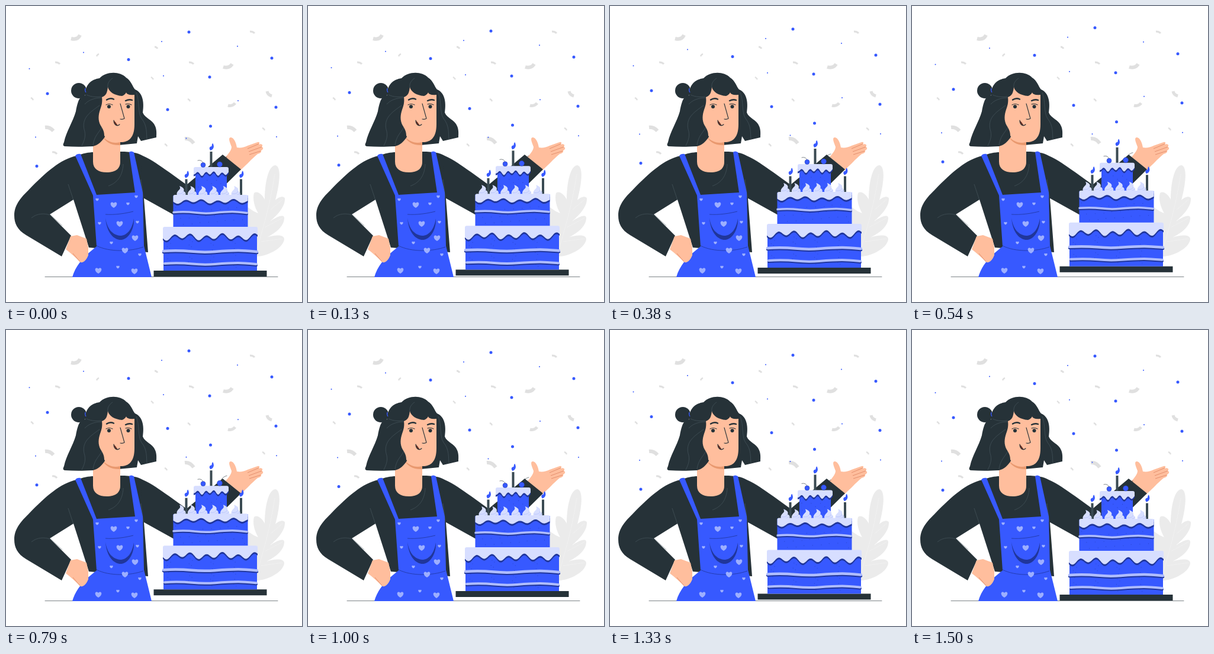
These frames come from a looping animation (500 px wide and 500 px high, 1540 ms). An HTML page:

```html
<!DOCTYPE html>
<html lang="en">
<head>
<meta charset="utf-8">
<title>Birthday cake</title>
<style>
html, body { margin: 0; height: 100%; overflow: hidden; background: #fff; }
svg { display: block; width: 100vw; height: 100vh; }
.blue { fill: #3759ff; }
.dark { fill: #263238; }
.skin { fill: #ffbe9d; }
.cream { fill: #d7deff; }
.shade { fill: #20369b; }
.line { fill: none; stroke: #263238; stroke-width: .6; stroke-linecap: round; }
.bold { stroke-width: 1.1; }
.fold { fill: none; stroke: #52626a; stroke-width: .5; }
.crease { fill: none; stroke: #e08b68; stroke-width: .9; }
.paper { fill: none; stroke: #e0e0e0; }
.dots { fill: none; stroke: #3759ff; stroke-linecap: round; }
.large { fill: none; marker: url(#heart); }
.small { fill: none; marker: url(#tinyHeart); }
</style>
</head>
<body>
<svg viewBox="0 0 500 500">
  <defs>
    <path id="heartShape" d="M0 5C-9 0-5-8 0-3C5-8 9 0 0 5Z" fill="#9dafff"/>
    <marker id="heart" markerUnits="userSpaceOnUse" overflow="visible"><use href="#heartShape"/></marker>
    <marker id="tinyHeart" markerUnits="userSpaceOnUse" overflow="visible"><use href="#heartShape" transform="scale(.5)"/></marker>
    <g id="swirl">
      <path class="cream" d="M-7 0C-9-5-5-8-3-10C-1-12-2-14-3-16C3-14 6-11 4-7C8-6 8-2 7 0Z"/>
      <path d="M-6-3C-1-2 4-4 4-8M-4 0C2 0 6-2 7-4" fill="none" stroke="#b4c0fc" stroke-width=".8"/>
    </g>
    <g id="candle">
      <rect x="-2" width="4" height="27" fill="#3a4a52"/>
      <path class="blue" d="M-1-2C-4-5-3-9 1-9C1-12 2-14 3-14C6-8 4-4-1-2Z"/>
    </g>
  </defs>

  <g class="paper">
    <path stroke-width="6" d="M110 55Q121 58 125 49M367 103Q377 106 382 98M66 205q8-1 14 6M302 224q9-1 15 8"/>
    <path stroke-width="5" d="M375 168q7 2 12-4M441 144q1 6 8 8"/>
    <path stroke-width="3" d="M83 95q5 0 8 3M309 95q5 0 8 3M412 43q5 0 8 3M78 247q5-1 8 3M251 69q3 0 5 3"/>
    <path stroke-width="2.4" d="M153 85q1-3 4-4M245 120q2 1 4 4M42 155q3 1 4 4M307 157q3 1 4 4M433 206q3 1 4 4M268 233q3 1 4 4"/>
  </g>

  <path fill="#ebebeb" d="M405 424V338C412 342 419 348 426 350C420 340 416 326 419 316C425 311 434 320 437 327C437 303 442 270 455 269C466 271 462 302 455 328C460 322 470 320 471 325C472 342 452 358 446 364C455 357 470 350 470 358C470 372 455 384 440 391C452 387 470 385 470 394C468 410 440 423 424 423Z"/>
  <path d="M424 410C436 370 447 330 454 284M447 344L467 327M437 374L467 358M431 398L467 393" fill="none" stroke="#f3f3f3" stroke-width=".7"/>
  <path class="line" d="M66 457.5H459"/>

  <!-- raised arm -->
  <path class="skin" d="M368 258C378 248 381 242 381 238C378 230 375 223 379 222C385 221 389 232 390 239C396 240 402 239 408 236L425 230C429 229 429 233 426 234C432 232 435 235 432 238C436 239 434 243 431 244C432 247 429 249 425 250C415 258 405 270 394 279Z"/>
  <path class="crease" d="M427 233L408 241M432 238L410 246M430 245L411 251"/>
  <path class="dark" d="M193 246C213 246 222 248 231 253C247 260 260 270 276 281L305 302L366 251L397 276L332 340L300 362L228 322Z"/>

  <!-- hair behind the head -->
  <circle class="dark" cx="123" cy="143" r="13"/>
  <path class="dark" d="M134 151C133 133 144 124 158 122C170 110 192 110 203 121C212 127 213 135 218 141C230 146 234 160 231 180C235 190 248 192 252 203C255 210 254 217 254 222L228 228L223 220L221 232L190 235L147 237C130 238 115 238 99 237C96 236 96 234 98 230C102 211 113 196 118 178C121 162 124 151 134 151Z"/>

  <!-- body -->
  <path class="dark" d="M119 253C130 249 140 247 148 247L200 246L228 270L233 325L240 416L140 408L114 327L74 352L110 388L94 423L34 387C19 378 14 367 14 354C14 340 20 328 38 311C68 280 92 259 119 253Z"/>
  <path class="fold" d="M43 358C52 350 65 350 74 353M105 301L114 328M198 267C197 288 187 299 173 304M228 293L232 324M74 352L95 371"/>
  <path class="skin" d="M147 215V263C147 275 156 281 170 281C186 281 193 274 193 263V215Z"/>
  <path fill="#e9996f" d="M163 220C171 229 181 233 193 230V235C178 236 168 230 163 220Z"/>

  <!-- apron -->
  <path class="blue" d="M117 253Q120 249 126 250L153 319L218 315L208 247Q211 244 216 247L231 315L233 405L246 458H112C117 440 130 425 141 416L153 406L147 320Z"/>
  <path class="shade" d="M168 358C170 386 185 396 195 395C209 393 217 374 216 359C213 378 204 388 193 388C181 387 171 378 168 358Z"/>
  <path fill="none" stroke="#20369b" stroke-width=".8" d="M168 352C183 353 199 351 215 347M153 405C175 416 210 415 232 407"/>
  <path class="large" d="M182 336L192 368L218 392L201 413L156 447L217 448"/>
  <path class="small" d="M154 327L206 334L220 322L222 365L158 367L178 400L226 420L189 441"/>
  <path class="skin" d="M109 389L120 387L136 393L139 408V421C136 429 131 434 126 433C118 425 110 418 101 411Z"/>
  <path class="crease" d="M113 418L125 432"/>

  <!-- head -->
  <path class="dark" d="M167 221C161 230 155 235 147 237H125L140 180H160Z"/>
  <path class="skin" d="M162 154C170 151 171 145 172 137C174 145 183 151 196 152Q201 150 203 146Q204 151 217 150V200C217 224 206 231 191 230C179 228 170 224 166 219C166 211 163 207 160 202C155 193 156 184 159 175C162 167 163 161 162 154Z"/>
  <path class="fold" d="M162 155C148 155 138 160 133 166M158 168C141 180 126 190 133 212C135 222 131 230 128 236M162 205C156 215 149 220 147 235M136 150C145 154 153 154 161 153M172 138C171 131 174 126 180 122M220 146C226 160 222 180 229 190C239 202 237 216 238 225"/>
  <path d="M134 139Q133 143 135 146" fill="none" stroke="#3759ff" stroke-width="1.3"/>
  <path fill="none" stroke="#263238" stroke-width="2.4" stroke-linecap="round" d="M170 158.5Q176 154.5 182 157.5M202 160Q208 157 213 159"/>
  <g class="dark"><circle cx="174" cy="170" r="3"/><circle cx="206.5" cy="170" r="3"/></g>
  <path class="line bold" d="M169 167Q174 164 180 167M202 166Q207 164 212 167M193 165L200 190Q197 192 193 191"/>
  <path fill="#6b3024" d="M182 193C182 199 185 203 189 202C187 199 186 197 182 193Z"/>
  <path class="line bold" d="M182 193C182 201 188 204 192 200"/>

  <g id="floating">
    <path class="dots" stroke-width="5" d="M309 44h0M207 90.5h0M449 88h0M344 120h0M70 148h0M456 171h0M273 175h0M345.5 203h0M52 270.5h0"/>
    <path class="dots" stroke-width="2" d="M263 60h0M391 68h0M131 78.5h0M39.5 106h0M266 118h0M392 160h0M50 221.5h0M457 221h0M304.5 223.5h0"/>
    <rect class="dark" x="249.5" y="447" width="191" height="10"/>
    <use href="#candle" x="346.5" y="246"/>
    <use href="#candle" x="304.5" y="292.5"/>
    <use href="#candle" x="397" y="292.5"/>
    <path class="line" d="M333 265C331 261 328 260 324 261M362 264C365 259 368 256 373 255"/>
    <g id="cake"></g>
    <g class="blue" stroke="#20369b" stroke-width=".5"><circle cx="333" cy="268.5" r="4"/><circle cx="361" cy="267.5" r="4.5"/></g>
  </g>
</svg>
<script>
const byId = id => document.getElementById(id);
const repeat = (n, make) => Array.from({ length: n }, (_, i) => make(i)).join('');

// Cream with a wavy lower edge: one drip per period, some longer than others
function frosting(x, y, w, depth, period, firstDrip) {
  const wave = (at, length) => Math.cos((at - firstDrip) / length * 2 * Math.PI);
  const edge = repeat(w + 1, i => {
    const at = x + w - i;
    return `L${at} ${(y + depth + depth * .25 * wave(at, period) + depth * .12 * wave(at, period * 2.3)).toFixed(1)}`;
  });
  const d = `M${x} ${y + 3}Q${x} ${y} ${x + 3} ${y}H${x + w - 3}Q${x + w} ${y} ${x + w} ${y + 3}${edge}Z`;
  return `<path class="shade" d="${d}" transform="translate(0 3)"/><path class="cream" d="${d}"/>`;
}

const sponge = (x, y, w, h) => `<rect class="blue" x="${x}" y="${y}" width="${w}" height="${h}"/>` +
  repeat(w * h / 260 | 0, i =>
    `<circle class="shade" opacity=".5" cx="${x + 4 + i * 37.7 % (w - 8)}" cy="${y + 20 + i * 17.3 % (h - 23)}" r=".6"/>`);

function band(x, y, w, thickness) {
  const d = `M${x} ${y}c${w * .3}-3 ${w * .3} 4 ${w * .55} 1s${w * .3}-2 ${w * .45} 0`;
  const stroke = (color, dy) => `<path d="${d}" fill="none" stroke="${color}" stroke-width="${thickness}"
    stroke-linecap="round" transform="translate(0 ${dy})"/>`;
  return stroke('#20369b', 2) + stroke('#afbdff', 0);
}

byId('cake').innerHTML =
  sponge(320, 274, 53, 46) + frosting(317, 272, 59, 11, 13.5, 331) +
  repeat(6, i => `<use href="#swirl" x="${296 + 18.4 * i}" y="320"/>`) +
  sponge(282.5, 320, 126, 54) + frosting(282.5, 319, 126, 11, 27, 290) + band(283, 348.5, 124, 3.5) +
  sponge(266, 375, 158, 72) + frosting(265, 373, 160, 17, 27, 271) + band(266, 414, 158, 4.5) + band(268, 435, 155, 4);

// Linear rise and fall of 10 px in 1.5 s, stepped at 24 per second
function draw(now) {
  const step = Math.floor((now % 1540 + 5) * .024);
  const p = (step / .024 + 25) % 1500 / 750;
  byId('floating').setAttribute('transform', `translate(0 ${.33 - 10 * Math.min(p, 2 - p)})`);
  requestAnimationFrame(draw);
}
draw(0);
</script>
</body>
</html>
```
